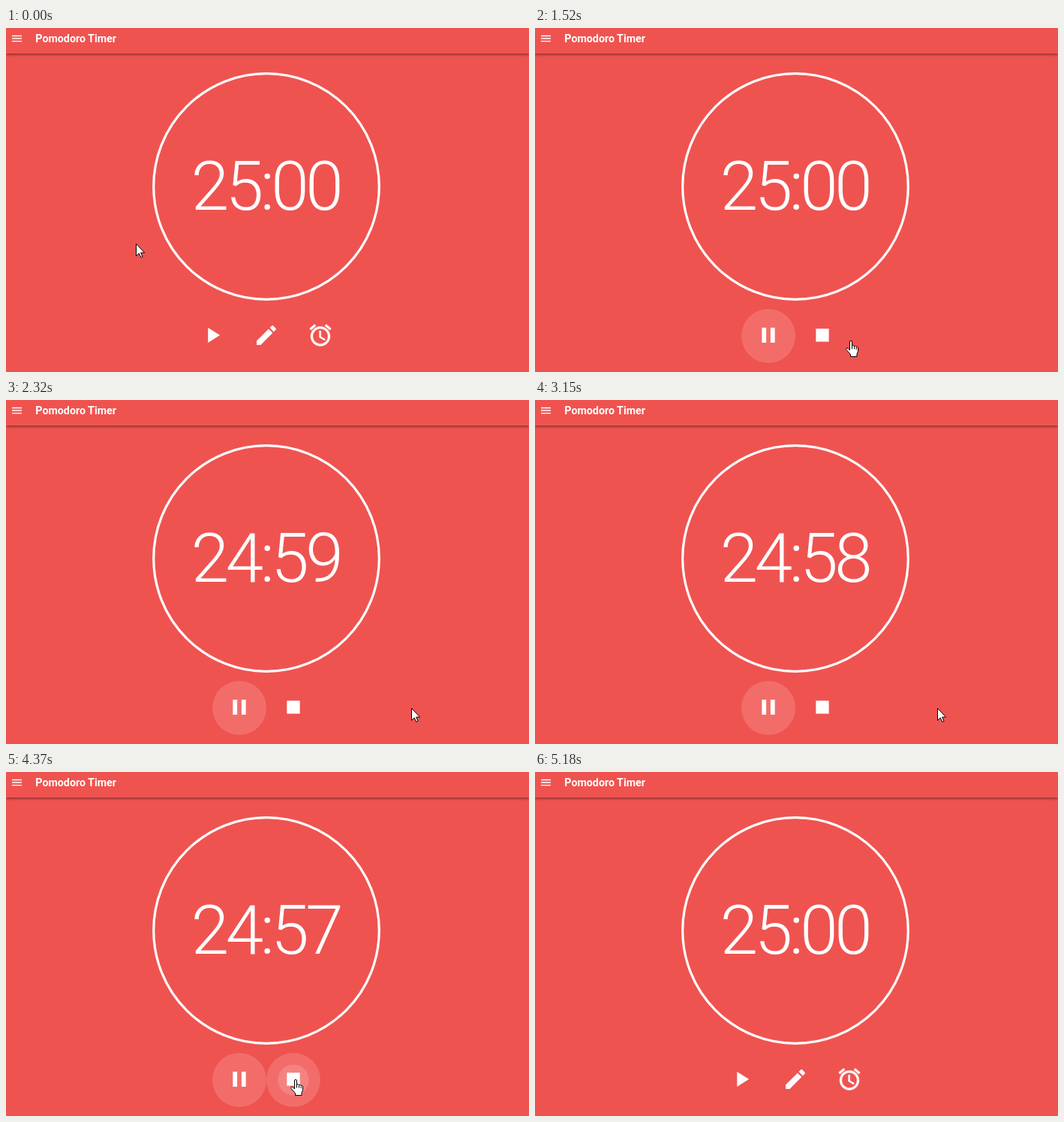
Animation of 697 by 458 pixels, one loop 5460 ms. Source, as an HTML page:

```html
<!DOCTYPE html>
<html lang="en">
<head>
<meta charset="utf-8">
<title>Pomodoro Timer</title>
<style>
  html, body { margin: 0; width: 100%; height: 100%; overflow: hidden; background: #ef5350; }
  header {
    position: absolute; left: 0; right: 0; top: 0; height: 34px; background: #ef5350;
    box-shadow: 0 1.4px 2.9px -.7px rgba(0,0,0,.3), 0 2px 3px rgba(0,0,0,.18), 0 .7px 4px rgba(0,0,0,.12);
  }
  svg { position: absolute; left: 0; top: 0; display: block; }
  text { font-family: Roboto, "Open Sans", sans-serif; fill: #fff; }
  .title { font-size: 14.25px; font-weight: 700; }
  .clock { font-size: 91px; font-weight: 300; letter-spacing: -.05em; text-anchor: middle; }
  .icon { fill: #fff; }
  .alarm { stroke: #fff; stroke-width: .3; }
</style>
</head>
<body>
<header></header>
<svg width="697" height="458" viewBox="0 0 697 458">
  <path class="icon" transform="translate(5.9 5.4) scale(.72)" d="M3 18h18v-2H3zM3 13h18v-2H3zM3 6v2h18V6z"/>
  <text class="title" x="39.3" y="19">Pomodoro Timer</text>
  <circle cx="347" cy="211" r="150.3" fill="none" stroke="#fff" stroke-width="3.2"/>
  <text class="clock" id="clock" x="346" y="242">25:00</text>
  <g id="idle"></g>
  <g id="running"></g>
  <g id="arrow" stroke="#000" fill="#fff">
    <path d="M.5 .5V16.6L4.2 13.1 6.9 18.5 9 17.6 6.6 12.2H11.6Z"/>
  </g>
  <g id="hand" stroke="#000" fill="#fff" stroke-linejoin="round">
    <path d="M-.5 13V2a1.5 1.5 0 0 1 3 0V7.3c.5-1 2.6-.8 3 .5 .5-.8 2.4-.6 2.7.8 .6-.7 2.3-.3 2.3 1.4V14.5L9 18v3.5H.5V18.5L-5 12.5c-1-1.6.7-3 2.2-2Z"/>
    <path d="M2.5 7v4.5M5.5 8v3.5M8.2 9v3" fill="none"/>
  </g>
</svg>
<script>
const LOOP = 5460, TICK = 136;            // the pointer moves once per tick
const STARTED = 1100, STOPPED = 4670;     // the timer runs in between
const FIRST_SECOND = 1920, SECOND = 972;
const HOVER = .15, FADE = 200;
const $ = id => document.getElementById(id);

const icons = {
  play: "M8 5v14l11-7z",
  pause: "M6 19h4V5H6v14zm8-14v14h4V5h-4z",
  stop: "M6 6h12v12H6z",
  edit: "M3 17.25V21h3.75L17.81 9.94l-3.75-3.75L3 17.25zM20.71 7.04c.39-.39.39-1.02 0-1.41l-2.34-2.34c-.39-.39-1.02-.39-1.41 0l-1.83 1.83 3.75 3.75 1.83-1.83z",
  alarm: "M22 5.72l-4.6-3.86-1.29 1.53 4.6 3.86L22 5.72zM7.88 3.39L6.6 1.86 2 5.71l1.29 1.53 4.59-3.85zM12.5 8H11v6l4.75 2.85.75-1.23-4-2.37V8zM12 4c-4.97 0-9 4.03-9 9s4.02 9 9 9c4.97 0 9-4.03 9-9s-4.03-9-9-9zm0 16c-3.87 0-7-3.13-7-7s3.13-7 7-7 7 3.13 7 7-3.13 7-7 7z"
};

// Where the pointer slows down or turns: [tick, x, y]
const path = [
  [0, 173, 287], [2, 193, 365], [5, 265, 397], [7, 265, 397],
  [9, 421, 434], [10, 421, 428], [11, 420, 416], [13, 411, 413],
  [15, 543, 410], [23, 536, 410], [25, 482, 410], [28, 422, 414],
  [29, 411, 413], [31, 385, 409], [34, 385, 409], [35, 503, 425], [36, 620, 470]
];

const clamp = v => Math.max(0, Math.min(1, v));
const easeOut = p => 1 - (1 - p) ** 2;

function add(parent, tag, attrs) {
  const el = document.createElementNS("http://www.w3.org/2000/svg", tag);
  for (const key in attrs) el.setAttribute(key, attrs[key]);
  return parent.appendChild(el);
}

const glows = [];

function addGlow(group, cx, from, to, click) {
  const circle = r => add($(group), "circle", { cx, cy: 410, r, fill: "#fff" });
  glows.push({ disc: circle(36), ripple: circle(0), from, to, click });
}

function addIcons(group, names, x) {
  names.forEach((name, i) => add($(group), "path", {
    class: "icon " + name, d: icons[name],
    transform: `translate(${x + 72 * i} 409) scale(1.44) translate(-12 -12)`
  }));
}

addGlow("idle", 275, 500, STARTED, 900);
addGlow("idle", 419, 4450, 5180, 4450);
addGlow("running", 311, 900, 4520, LOOP);
addGlow("running", 383, 1570, 2000, LOOP);
addGlow("running", 383, 4060, STOPPED, 4200);
addIcons("idle", ["play", "edit", "alarm"], 275);
addIcons("running", ["pause", "stop"], 311);

function clockText(t) {
  const gone = t < FIRST_SECOND || t >= STOPPED ? 0 : 1 + Math.floor((t - FIRST_SECOND) / SECOND);
  const left = 25 * 60 - gone;
  return Math.floor(left / 60) + ":" + String(left % 60).padStart(2, "0");
}

function pointerAt(tick) {
  const i = path.findIndex(point => point[0] > tick);
  if (i < 0) return path[path.length - 1].slice(1);
  const [k0, x0, y0] = path[i - 1], [k1, x1, y1] = path[i];
  const p = easeOut((tick - k0) / (k1 - k0));
  return [x0 + (x1 - x0) * p, y0 + (y1 - y0) * p].map(Math.round);
}

function show(id, on) {
  $(id).style.display = on ? "" : "none";
}

function draw(t) {
  const running = t >= STARTED && t < STOPPED;
  show("running", running);
  show("idle", !running);
  $("clock").textContent = clockText(t);

  for (const { disc, ripple, from, to, click } of glows) {
    const age = t - click;
    disc.setAttribute("opacity", t < to ? HOVER * clamp((t - from) / FADE) : 0);
    ripple.setAttribute("r", 24 * clamp(age / FADE));
    ripple.setAttribute("opacity", HOVER * clamp((500 - age) / FADE));
  }

  const [x, y] = pointerAt(Math.floor(t / TICK));
  const onStop = Math.hypot(x - 383, y - 410) < 38;
  show("hand", onStop);
  show("arrow", !onStop);
  for (const id of ["arrow", "hand"]) $(id).setAttribute("transform", `translate(${x} ${y})`);
}

const start = performance.now();
function frame() {
  draw((performance.now() - start) % LOOP);
  requestAnimationFrame(frame);
}
frame();
</script>
</body>
</html>
```
